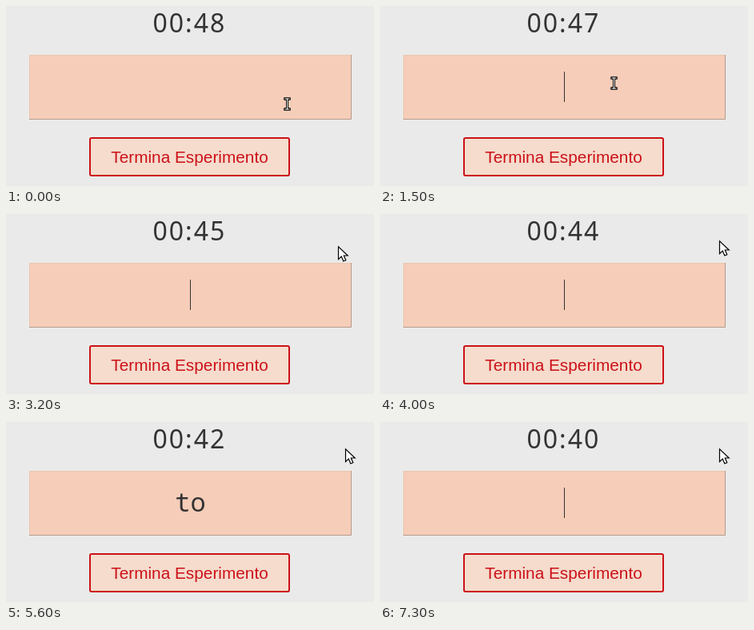
Animation, 460 px wide and 225 px high, one loop 8 s. Source, as an HTML page:

```html
<!DOCTYPE html>
<html lang="it">
<head>
<meta charset="utf-8">
<style>
  html, body { margin: 0; width: 100%; height: 100%; overflow: hidden; background: #eaeaea; }
  svg { display: block; }
  #clock { font: 32px "Noto Sans", "Open Sans", sans-serif; letter-spacing: 2px; }
  #word { font: 32px "Noto Sans Mono", "DejaVu Sans Mono", monospace; }
  #label { font: 20.8px "Liberation Sans", Arial, sans-serif; }
</style>
</head>
<body>
<svg width="460" height="225" viewBox="0 0 460 225">
  <text id="clock" x="183.5" y="33" fill="#333"></text>

  <rect x="29" y="61" width="403" height="81" fill="#f6cdb9"/>
  <path d="M29.5 141V61.5H431" fill="none" stroke="#e9c8ae"/>
  <path d="M29 141.5H431.5V61" fill="none" stroke="#b59a8c"/>
  <text id="word" x="230.4" y="112" text-anchor="middle" fill="#333"></text>
  <rect id="caret" y="82" width="1" height="38" fill="#333"/>

  <rect x="105" y="165" width="249" height="47" rx="2" fill="#f5dccd" stroke="#cc1119" stroke-width="2"/>
  <text id="label" x="229.5" y="196" text-anchor="middle" fill="#cc1119">Termina Esperimento</text>

  <g id="beam" fill="none" stroke-linecap="square">
    <path id="beamShape" d="M-2.5 -6.5H2.5M0 -6.5V6.5M-2.5 6.5H2.5" stroke="#000" stroke-width="3"/>
    <use href="#beamShape" stroke="#fff"/>
    <path d="M-2.5 -6.5H2.5M0 -6.5V6.5M-2.5 6.5H2.5" stroke="#fff" stroke-width="1"/>
  </g>
  <path id="arrow" d="M.5 .8V16.6L4.3 13.1L6.8 19L9.8 17.7L7.3 12H12.2Z" fill="#fff" stroke="#000" stroke-width="1.2"/>
</svg>
<script>
const LOOP = 8000;
const CHAR = 19.2;
const $ = id => document.getElementById(id);

// Each track lists [start time, value...]; a value holds until the next entry.
const seconds = [[0, 48], [600, 47], [1600, 46], [2700, 45], [3600, 44],
  [4600, 43], [5600, 42], [6400, 41], [7300, 40]];
const typed = [[0, ""], [4500, "t"], [4900, "to"], [6000, "top"], [6400, "topo"], [7300, ""]];
const caretOn = [[0, 0], [400, 1], [900, 0], [1500, 1], [2100, 0], [2600, 1],
  [3300, 0], [4000, 1], [5500, 0], [6000, 1], [7000, 0], [7300, 1]];
const pointer = [[0, "beam", 351.5, 122.5], [100, "beam", 314.5, 105.5], [200, "beam", 292.5, 96.5],
  [3000, "beam", 328.5, 83.5], [3100, "beam", 382.5, 63.5], [3200, "arrow", 415, 40], [3300, "arrow", 424, 33]];

const at = (track, t) => track.findLast(step => step[0] <= t).slice(1);

function draw(now) {
  const t = now % LOOP;
  const [word] = at(typed, t);
  const [kind, x, y] = at(pointer, t);
  $("clock").textContent = "00:" + at(seconds, t)[0];
  $("word").textContent = word;
  $("caret").setAttribute("x", Math.floor(230.4 + word.length * CHAR / 2));
  $("caret").setAttribute("opacity", at(caretOn, t)[0]);
  for (const id of ["beam", "arrow"]) {
    $(id).setAttribute("visibility", id === kind ? "visible" : "hidden");
    $(id).setAttribute("transform", `translate(${x} ${y})`);
  }
}

const start = performance.now();
function frame() {
  draw(performance.now() - start);
  requestAnimationFrame(frame);
}
frame();
</script>
</body>
</html>
```
